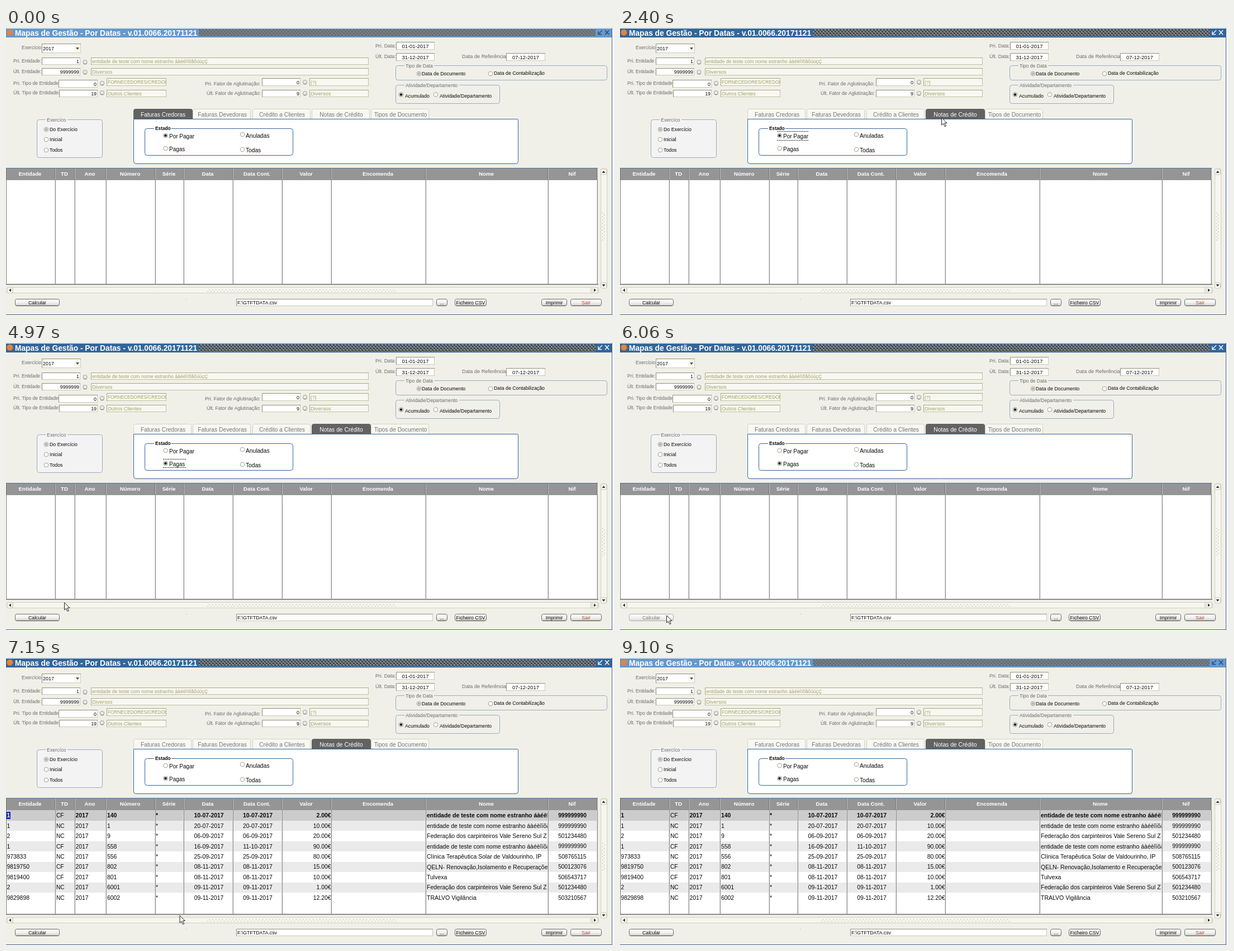
Write an HTML page with a canvas that moves like this. It is 1088x515 px and loops after 9170 ms.

```html
<!DOCTYPE html>
<html lang="pt">
<head>
<meta charset="utf-8">
<title>Mapas de Gestão</title>
<style>
html, body { margin: 0; width: 100%; height: 100%; overflow: hidden; background: #fff; }
canvas { display: block; }
</style>
</head>
<body>
<canvas id="stage" width="1088" height="515"></canvas>
<script>
const c = document.getElementById('stage').getContext('2d');
const LOOP = 9170;
const BG = '#f0f0e8', BLUE = '#336699', LABEL = '#6c6c6c', OLIVE = '#a0a068', INK = '#0a0a0a';
const COLS = [0, 88, 123, 179, 267, 318, 406, 494, 582, 751, 970, 1058];
const HEADS = ['Entidade', 'TD', 'Ano', 'Número', 'Série', 'Data', 'Data Cont.', 'Valor', 'Encomenda', 'Nome', 'Nif'];
const TABS = ['Faturas Credoras', 'Faturas Devedoras', 'Crédito a Clientes', 'Notas de Crédito', 'Tipos de Documento'];
const TEST = 'entidade de teste com nome estranho áàéèîïõãôúùçÇ';
const UNION = 'Federação dos carpinteiros Vale Sereno Sul Z';
// entity, type, number, date, accounting date, value, name, tax id
const ROWS = [
  ['1', 'CF', '140', '10-07', '10-07', '2.00', TEST, '999999990'],
  ['1', 'NC', '1', '20-07', '20-07', '10.00', TEST, '999999990'],
  ['2', 'NC', '9', '06-09', '06-09', '20.00', UNION, '501234480'],
  ['1', 'CF', '558', '16-09', '11-10', '90.00', TEST, '999999990'],
  ['973833', 'NC', '556', '25-09', '25-09', '80.00', 'Clínica Terapêutica Solar de Valdourinho, IP', '508765115'],
  ['9819750', 'CF', '802', '08-11', '08-11', '15.00', 'QELN- Renovação,Isolamento e Recuperações', '500123076'],
  ['9819400', 'CF', '801', '08-11', '08-11', '10.00', 'Tulvexa', '506543717'],
  ['2', 'NC', '6001', '09-11', '09-11', '1.00', UNION, '501234480'],
  ['9829898', 'NC', '6002', '09-11', '09-11', '12.20', 'TRALVO Vigilância', '503210567']
];
// pointer legs: start, end, steps, from, control, to; skip = 1 leaves the starting point out
const LEGS = [
  { a: 140, b: 990, n: 12, p: [984, 503, 800, 300, 603, 162], skip: 0 },
  { a: 1080, b: 1160, n: 2, p: [603, 162, 602, 160, 602, 157], skip: 1 },
  { a: 2320, b: 3100, n: 11, p: [602, 157, 450, 180, 311, 215.5], skip: 1 },
  { a: 3650, b: 3710, n: 2, p: [311, 215.5, 311, 217, 311.5, 219], skip: 1 },
  { a: 4260, b: 5120, n: 12, p: [311.5, 219, 200, 350, 88, 486], skip: 1 },
  { a: 5190, b: 5360, n: 3, p: [88, 486, 85, 487, 83.5, 489], skip: 1 },
  { a: 6840, b: 7550, n: 10, p: [83.5, 489, 400, 428, 755, 498], skip: 1 },
  { a: 8010, b: 8562, n: 8, p: [775.5, 494, 880, 492, 994, 505], skip: 0 }
];
const POINTER_OUT = 8640;

function txt(s, x, y, size, color = INK, align = 'left', bold = false) {
  c.font = `${bold ? 'bold ' : ''}${size}px "Liberation Sans", Arial, sans-serif`;
  c.fillStyle = color;
  c.textAlign = align;
  c.fillText(s, x, y + size * 0.36);
}

function rect(x, y, w, h, color) {
  c.fillStyle = color;
  c.fillRect(x, y, w, h);
}

function round(x, y, w, h, r, stroke, fill) {
  c.beginPath();
  c.roundRect(x + 0.5, y + 0.5, w, h, r);
  if (fill) { c.fillStyle = fill; c.fill(); }
  c.strokeStyle = stroke;
  c.lineWidth = 1;
  c.stroke();
}

function disc(x, y, r, fill, stroke) {
  c.beginPath();
  c.arc(x, y, r, 0, 7);
  c.fillStyle = fill;
  c.fill();
  if (stroke) { c.strokeStyle = stroke; c.lineWidth = 1; c.stroke(); }
}

function line(color, width, ...pts) {
  c.beginPath();
  for (let i = 0; i < pts.length; i += 2) c.lineTo(pts[i], pts[i + 1]);
  c.strokeStyle = color;
  c.lineWidth = width;
  c.stroke();
}

function tri(x, y, dx, dy, color = '#333') {
  c.beginPath();
  c.moveTo(x + dx * 2, y + dy * 2);
  c.lineTo(x - dx * 2 - dy * 3, y - dy * 2 - dx * 3);
  c.lineTo(x - dx * 2 + dy * 3, y - dy * 2 + dx * 3);
  c.fillStyle = color;
  c.fill();
}

function field(x, y, x1, y1, s, { align = 'left', off = false, size = 8.8 } = {}) {
  rect(x, y, x1 - x, y1 - y, off ? '#f8f8f2' : '#fff');
  c.strokeStyle = off ? '#c0c0a0' : '#cacab4';
  c.lineWidth = 1;
  c.strokeRect(x + 0.5, y + 0.5, x1 - x - 1, y1 - y - 1);
  line(off ? '#a8a884' : '#90907a', 1, x + 0.5, y1, x + 0.5, y + 0.5, x1, y + 0.5);
  const tx = { left: x + 2, right: x1 - 2, center: (x + x1) / 2 }[align];
  c.save();
  c.beginPath();
  c.rect(x, y, x1 - x - 1, y1 - y);
  c.clip();
  txt(s, tx, (y + y1) / 2 + 0.5, size, off ? OLIVE : INK, align);
  c.restore();
}

function radio(x, y, state, label, size, lx, ly) {
  disc(x, y, 3.8, state === 'off' ? '#f0f0ec' : '#fff', state === 'on' ? '#8f8d80' : '#a3a090');
  if (state) disc(x, y, 2.3, state === 'on' ? '#111' : '#b0b0ac');
  txt(label, lx, ly, size);
}

function group(x, y, x1, y1, label, lx, lw, color, size, fill = BG, bold = false) {
  round(x, y, x1 - x, y1 - y, 4, color, fill);
  rect(lx - 2, y - 3, lw + 4, 7, fill);
  txt(label, lx, y + 0.5, size, bold ? INK : LABEL, 'left', bold);
}

function lens(x, y) {
  disc(x, y, 3.6, '#e8e8e4', '#a2a29c');
  line('#7c7c78', 1, x - 3, y + 2.8, x, y + 4, x + 3, y + 2.8);
}

function button(x, x1, s, size, pos, color = INK) {
  const hot = pos && pos[0] >= x && pos[0] <= x1 && pos[1] >= 485.5 && pos[1] <= 500;
  const g = c.createLinearGradient(0, 486, 0, 499);
  g.addColorStop(0, '#fff');
  g.addColorStop(0.55, '#f1f1ee');
  g.addColorStop(1, hot ? '#dadad6' : '#c4c4c0');
  round(x, 486, x1 - x - 1, 12, 3, hot ? '#aaa' : '#6a6a6a', g);
  if (!hot) line('#444', 1, x + 3, 498.5, x1 - 3, 498.5);
  txt(s, (x + x1) / 2, 493, size, hot ? '#777' : color, 'center');
}

function texture(base, dark, light) {
  const tile = document.createElement('canvas');
  tile.width = 6;
  tile.height = 6;
  const k = tile.getContext('2d');
  k.fillStyle = base;
  k.fillRect(0, 0, 6, 6);
  for (const [x, y] of [[0, 0], [3, 3]]) {
    k.fillStyle = dark;
    k.fillRect(x, y, 3, 2);
    k.fillStyle = light;
    k.fillRect(x, y + 2, 2, 1);
  }
  return c.createPattern(tile, 'repeat');
}
const ACTIVE = texture('#6d747a', '#33383e', '#b4b4ae');
const IDLE = texture('#737b83', '#5e666e', '#8b9094');

function titleBar(active) {
  rect(0, 1, 1084, 16, active ? BLUE : '#6699cc');
  rect(345, 2, 710, 13, active ? ACTIVE : IDLE);
  disc(7, 8, 5.5, '#e58338');
  txt('Mapas de Gestão - Por Datas - v.01.0066.20171121', 16, 9, 13.75, '#fff', 'left', true);
  const ink = active ? '#fff' : '#2b4a70';
  line(ink, 1.3, 1067, 4, 1060, 11);
  line(ink, 1.3, 1060, 6, 1060, 11.5, 1066, 11.5);
  line(ink, 1.4, 1072, 4, 1079, 12);
  line(ink, 1.4, 1079, 4, 1072, 12);
}

function filters() {
  const right = { align: 'right' }, off = { off: true }, mid = { align: 'center', size: 9.4 };
  txt('Exercício', 28, 35, 8.6, LABEL);
  field(64, 28, 134, 45, '2017', { size: 9 });
  rect(122, 30, 10, 13, '#f6f6f0');
  tri(128, 37, 0, 1, '#555533');

  txt('Pri. Entidade:', 13, 59, 8.4, LABEL);
  txt('Últ. Entidade:', 13, 77.5, 8.4, LABEL);
  txt('Pri. Tipo de Entidade', 13, 99, 8.7, LABEL);
  txt('Últ. Tipo de Entidade:', 13, 116, 8.7, LABEL);
  txt('Pri. Fator de Aglutinação:', 356, 99.5, 8.8, LABEL);
  txt('Últ. Fator de Aglutinação:', 359, 117, 8.6, LABEL);
  txt('Pri. Data:', 661, 31.5, 8.8, LABEL);
  txt('Últ. Data:', 661, 51, 8.8, LABEL);
  txt('Data de Referência:', 816, 51, 9.2, LABEL);

  field(64, 53, 133, 66, '1', right);
  field(152, 53, 649, 66, TEST, { off: true, size: 8.7 });
  field(64, 72, 133, 85, '9999999', right);
  field(152, 72, 649, 85, 'Diversos', { off: true, size: 9.4 });
  field(94, 93, 164, 107, '0', right);
  field(180, 90, 287, 104, 'FORNECEDORES/CREDORES', { off: true, size: 8.3 });
  field(95, 111, 164, 124, '19', right);
  field(180, 111, 287, 124, 'Outros Clientes', off);
  field(458, 90, 527, 104, '0', right);
  field(543, 90, 649, 104, '(?)', off);
  field(458, 111, 527, 124, '9', right);
  field(543, 111, 649, 124, 'Diversos', { off: true, size: 9.4 });
  field(698, 25, 767, 39, '01-01-2017', mid);
  field(698, 45, 767, 59, '31-12-2017', mid);
  field(895, 45, 965, 59, '07-12-2017', mid);
  for (const [x, y] of [[141.5, 61], [141.5, 79], [172, 99], [172, 116], [535, 97], [535, 117]]) lens(x, y);

  const edge = '#9aabc4';
  group(697, 67, 1075, 93, 'Tipo de Data', 715, 49, edge, 8.6);
  radio(739, 82, 'off', 'Data de Documento', 8.8, 744, 82);
  radio(867, 82, '', 'Data de Contabilização', 8.8, 873, 81);
  group(697, 102, 883, 135, 'Atividade/Departamento', 715, 94, edge, 8.7);
  radio(707, 119.5, 'on', 'Acumulado', 8.8, 714, 122);
  radio(769, 119.5, '', 'Atividade/Departamento', 8.7, 776, 122);
  group(55, 164, 172, 232, 'Exercíco', 73, 35, edge, 8.9, '#f3f3f3');
  radio(72, 182, 'off', 'Do Exercício', 8.8, 78, 181.5);
  radio(72, 200, '', 'Inicial', 8.8, 78, 199.5);
  radio(72, 219, '', 'Todos', 8.8, 78, 218.5);
}

function tabs(t) {
  const current = t < 1690 ? 0 : 3;
  TABS.forEach((s, i) => {
    const x = Math.round(228 + i * 106.3), on = i === current;
    round(x, 145, on ? 105 : 103, 18, [3, 3, 0, 0], on ? '#626262' : '#d2d2c0', on ? '#626262' : '#f8f8f3');
    txt(s, x + 53, 155, 10.3, on ? '#fff' : '#757575', 'center');
  });
  round(228, 163, 688, 80, [0, 2, 4, 4], BLUE, '#fff');
  group(248, 180, 513, 228, 'Estado', 267, 27, BLUE, 8.3, '#fff', true);
  radio(285.5, 193, t < 3480 ? 'on' : '', 'Por Pagar', 10, 292, 194);
  radio(285.5, 216, t < 3410 ? '' : t < 3480 ? 'off' : 'on', 'Pagas', 10, 292, 217);
  radio(423, 191, '', 'Anuladas', 10.2, 429, 193);
  radio(423, 218, '', 'Todas', 10.2, 429, 219);
  if (t >= 1690 && t < 5680) {
    const [y0, y1, x1] = t < 3410 ? [185.5, 201.5, 337] : [208.5, 223.5, 322];
    c.setLineDash([2, 1]);
    line('#222', 1, 281, y0, x1, y0);
    line('#222', 1, 281, y1, x1, y1);
    c.setLineDash([]);
  }
}

function row(r, i, selected) {
  const y = 282.5 + i * 18.45, bold = i === 0;
  if (bold) rect(1, 273, 1057, 19, '#cccccc');
  else if (i % 2) rect(1, Math.round(y - 9), 1057, 18, '#eaeaea');
  if (selected) rect(1, 276, 7, 13, '#0a24c4');
  const put = (s, x, align, size = 10.4, color = INK) => txt(s, x, y, size, color, align, bold);
  put(r[0], 1.5, 'left', 10.4, selected ? '#fff' : INK);
  txt(r[1], 90, y, 10.2);
  put('2017', 124.5, 'left');
  put(r[2], 181, 'left');
  put('*', 268, 'left');
  put(r[3] + '-2017', 363, 'center');
  put(r[4] + '-2017', 450.5, 'center');
  put(r[5] + '€', 581.5, 'right');
  c.save();
  c.beginPath();
  c.rect(752, y - 9, 217, 18);
  c.clip();
  put(r[6], 753, 'left', 10.5);
  c.restore();
  put(r[7], 1013.5, 'center', 10.1);
}

function table(t) {
  rect(0, 272, 1059, 188, '#fff');
  if (t >= 6140) ROWS.forEach((r, i) => row(r, i, i === 0 && t < 9100));
  rect(0, 251, 1059, 22, '#959595');
  rect(0, 251, 1059, 1, '#4f76a0');
  rect(0, 251, 1, 210, '#777');
  COLS.forEach((x, i) => {
    if (i) {
      rect(x, 273, 1, 187, '#8c8c8c');
      rect(x - 1, 273, 1, 187, '#d6d6d6');
      rect(x - 1, 252, 1, 20, '#777');
      rect(x, 252, 1, 20, '#c0c0c0');
    }
    if (i < 11) txt(HEADS[i], (x + COLS[i + 1]) / 2 - 1, 262, 9.7, '#fff', 'center', true);
  });
  rect(0, 459, 1060, 2, '#8c8c8c');
}

function arrowBox(x, y, dx, dy) {
  round(x - 5.5, y - 5.5, 10, 10, 2, '#c6c6b4', '#f9f9f4');
  tri(x, y, dx, dy);
}

function scrollbars() {
  const edge = '#cfcfbd', fill = '#f6f6ef';
  round(1064, 252, 11, 214, 2, edge, fill);
  round(1, 465, 1059, 10, 2, edge, fill);
  arrowBox(1069.5, 258, 0, -1);
  arrowBox(1069.5, 462, 0, 1);
  arrowBox(7, 470.5, -1, 0);
  arrowBox(1054, 470.5, 1, 0);
  line(edge, 1, 12.5, 465, 12.5, 476);
  line(edge, 1, 1046.5, 465, 1046.5, 476);
  for (let i = 0; i < 113; i++) rect(360 + i * 3, 472 - (i % 2) * 3, 1.2, 1.2, '#aaa998');
  for (let i = 0; i < 17; i++) rect(1067 + (i % 2) * 3, 332 + i * 3, 1.2, 1.2, '#aaa998');
}

function footer(pos) {
  button(16, 96, 'Calcular', 8.7, pos);
  field(412, 486, 764, 499, 'F:\\GTFTDATA.csv');
  button(770, 790, '...', 9, pos);
  button(803, 860, 'Ficheiro CSV', 8.8, pos);
  button(958, 1004, 'Imprimir', 8.5, pos);
  button(1010, 1066, 'Sair', 9, pos, '#b5482e');
  rect(322, 486, 1.5, 1, '#bbb');
}

function pointerAt(t) {
  if (t < LEGS[0].a || t >= POINTER_OUT) return null;
  const leg = LEGS.findLast(l => t >= l.a);
  const { a, b, n, p, skip } = leg;
  const step = Math.min(n - 1, Math.floor((t - a) / (b - a) * (n - 1) + 1e-6));
  let u = (step + skip) / (n - 1 + skip);
  if (n > 9) u = u * u * (3 - 2 * u);
  const v = 1 - u;
  return [0, 1].map(k => v * v * p[k] + 2 * u * v * p[k + 2] + u * u * p[k + 4]);
}

function pointer([x, y], busy) {
  if (busy) {
    c.beginPath();
    c.arc(x + 0.5, y + 1, 7.5, 0, 7);
    c.lineWidth = 4;
    c.strokeStyle = '#3aa5d8';
    c.stroke();
    c.lineWidth = 1.5;
    c.strokeStyle = '#a9e0f5';
    c.stroke();
    return;
  }
  c.save();
  c.translate(x, y);
  c.beginPath();
  for (const [px, py] of [[0, 0], [0, 13], [3, 10.3], [5.4, 15.6], [7.6, 14.6], [5.2, 9.4], [9.3, 9.3]]) c.lineTo(px, py);
  c.closePath();
  c.fillStyle = '#fff';
  c.fill();
  c.strokeStyle = '#1c1c1c';
  c.lineWidth = 1;
  c.stroke();
  c.restore();
}

function draw(t) {
  const pos = pointerAt(t);
  rect(0, 0, 1088, 515, '#fff');
  rect(0, 0, 1084, 515, BG);
  titleBar(t >= 1690 && t < 9100);
  filters();
  tabs(t);
  table(t);
  scrollbars();
  footer(pos);
  rect(1084, 0, 1, 515, '#3f6289');
  rect(0, 514, 1085, 1, '#3f6289');
  if (pos) pointer(pos, t >= 5680 && t < 6060);
}

const start = performance.now();
function frame() {
  draw((performance.now() - start) % LOOP);
  requestAnimationFrame(frame);
}
frame();
</script>
</body>
</html>
```
